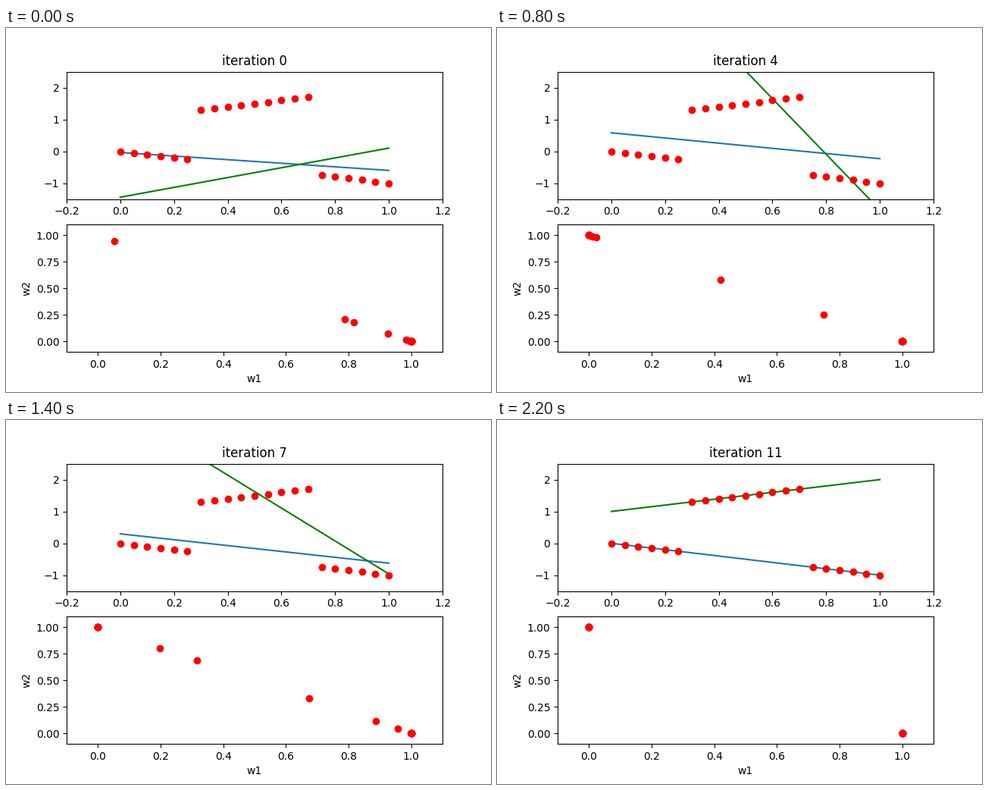
A matplotlib script that plays this animation: 640x480 px, repeating every 2400 ms.

```python
import numpy as np
import matplotlib.pyplot as plt
from matplotlib.animation import FuncAnimation

STEPS = 12
INTERVAL = 200
VARIANCE = 0.1

# Two line segments' worth of data: y = x + 1 in the middle, y = -x elsewhere.
x = np.arange(21) / 20
y = np.where((x > 0.28) & (x < 0.72), x + 1, -x)


def soft_assign(lines):
    """Weight of every point for each line (E step)."""
    logits = np.array([-(y - np.polyval(p, x)) ** 2 / VARIANCE for p in lines])
    w = np.exp(logits - logits.max(axis=0))
    return w / w.sum(axis=0)


def refit(weights):
    """Weighted least-squares line for each set of weights (M step)."""
    return [np.polyfit(x, y, 1, w=np.sqrt(w)) for w in weights]


def run_em(lines):
    history = []
    for _ in range(STEPS):
        weights = soft_assign(lines)
        history.append((lines, weights))
        lines = refit(weights)
    return history


# (slope, intercept) of the starting guesses
history = run_em([(-0.564, -0.0364), (1.541, -1.4408)])

fig, (ax_fit, ax_w) = plt.subplots(2, 1, figsize=(6.4, 4.8), dpi=100)

fits = [ax_fit.plot([], [], color=c)[0] for c in ("C0", "green")]
ax_fit.plot(x, y, "ro")
ax_fit.set(xlim=(-0.2, 1.2), ylim=(-1.5, 2.5))
title = ax_fit.set_title("iteration 0")

dots, = ax_w.plot([], [], "ro")
ax_w.set(xlim=(-0.1, 1.1), ylim=(-0.1, 1.1), xlabel="w1", ylabel="w2")


def draw(i):
    lines, weights = history[i]
    for artist, p in zip(fits, lines):
        artist.set_data(x, np.polyval(p, x))
    dots.set_data(*weights)
    title.set_text(f"iteration {i}")
    return [*fits, dots, title]


anim = FuncAnimation(fig, draw, frames=STEPS, interval=INTERVAL,
                     repeat=True, repeat_delay=0, blit=False)
plt.show()
```
